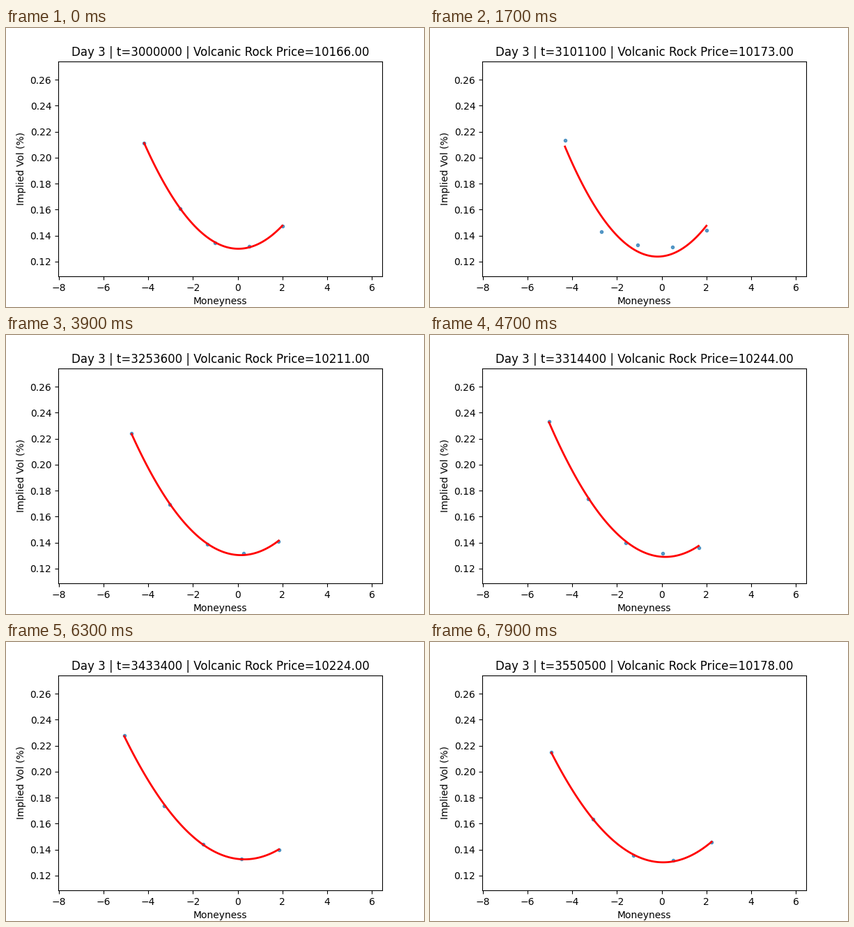
Recreate the animation shown at these times as a matplotlib script. Size 600 by 400 pixels, loop 8000 ms.

```python
import numpy as np
import matplotlib.pyplot as plt
from matplotlib.animation import FuncAnimation

FRAMES, INTERVAL = 80, 100
STRIKES = np.array([9500, 9750, 10000, 10250, 10500])

# Key points of the market path
KEY_FRAMES = [0, 17, 29, 39, 55, 71, 79]
KEY_STAMPS = [3000000, 3101100, 3184300, 3253600, 3375200, 3491500, 3550500]
KEY_PRICES = [10166, 10173, 10158, 10211, 10204, 10173, 10178]

# Implied vol per strike: level, price response, early dip, noise
LEVEL = np.array([.2133, .1622, .1352, .1318, .1463])
SLOPE = np.array([2.8, 2, 1, 0, -1.4]) * 1e-4
DIP = np.array([0, .026, .003, .001, .003])
NOISE = np.array([0, .0035, .0025, .0025, .002])

rng = np.random.default_rng(11)
frames = np.arange(FRAMES)
stamps = np.round(np.interp(frames, KEY_FRAMES, KEY_STAMPS), -2)

# Between key points the price rallies and jitters
phase = np.interp(frames, KEY_FRAMES, range(len(KEY_FRAMES)))
swing = np.abs(np.sin(np.pi * phase))
rally = np.where(phase > 1, 36, -8) + rng.normal(0, 4, FRAMES)
prices = np.round(np.interp(frames, KEY_FRAMES, KEY_PRICES) + rally * swing)

dip = np.exp(-((frames - 22) / 9) ** 2)
jitter = swing[:, None] * rng.normal(size=(FRAMES, 5)).clip(-1.8, 1.8)
vols = (LEVEL + np.outer(prices - 10173, SLOPE)
        - np.outer(dip, DIP) + jitter * NOISE)

# Time left shrinks linearly with the timestamp
spread = np.sqrt(2.628e-4 - 1.222e-10 * (stamps - 3e6))
money = np.log(STRIKES / prices[:, None]) / spread[:, None]

fig, ax = plt.subplots(figsize=(6, 4), dpi=100)
ax.set_xlim(-8.0216, 6.4584)
ax.set_ylim(.10868, .27398)
ax.set_xlabel("Moneyness")
ax.set_ylabel("Implied Vol (%)")
title = ax.set_title("")
dots, = ax.plot([], [], ".", ms=6, color="tab:blue", alpha=.7, zorder=1)
smile, = ax.plot([], [], color="red", lw=2)


def update(i):
    x, y = money[i], vols[i]
    xs = np.linspace(x.min(), x.max(), 100)
    dots.set_data(x, y)
    smile.set_data(xs, np.polyval(np.polyfit(x, y, 2), xs))
    title.set_text(f"Day 3 | t={stamps[i]:.0f} | "
                   f"Volcanic Rock Price={prices[i]:.2f}")
    return dots, smile, title


anim = FuncAnimation(fig, update, frames=FRAMES, interval=INTERVAL,
                     repeat=True, repeat_delay=0)
plt.show()
```
